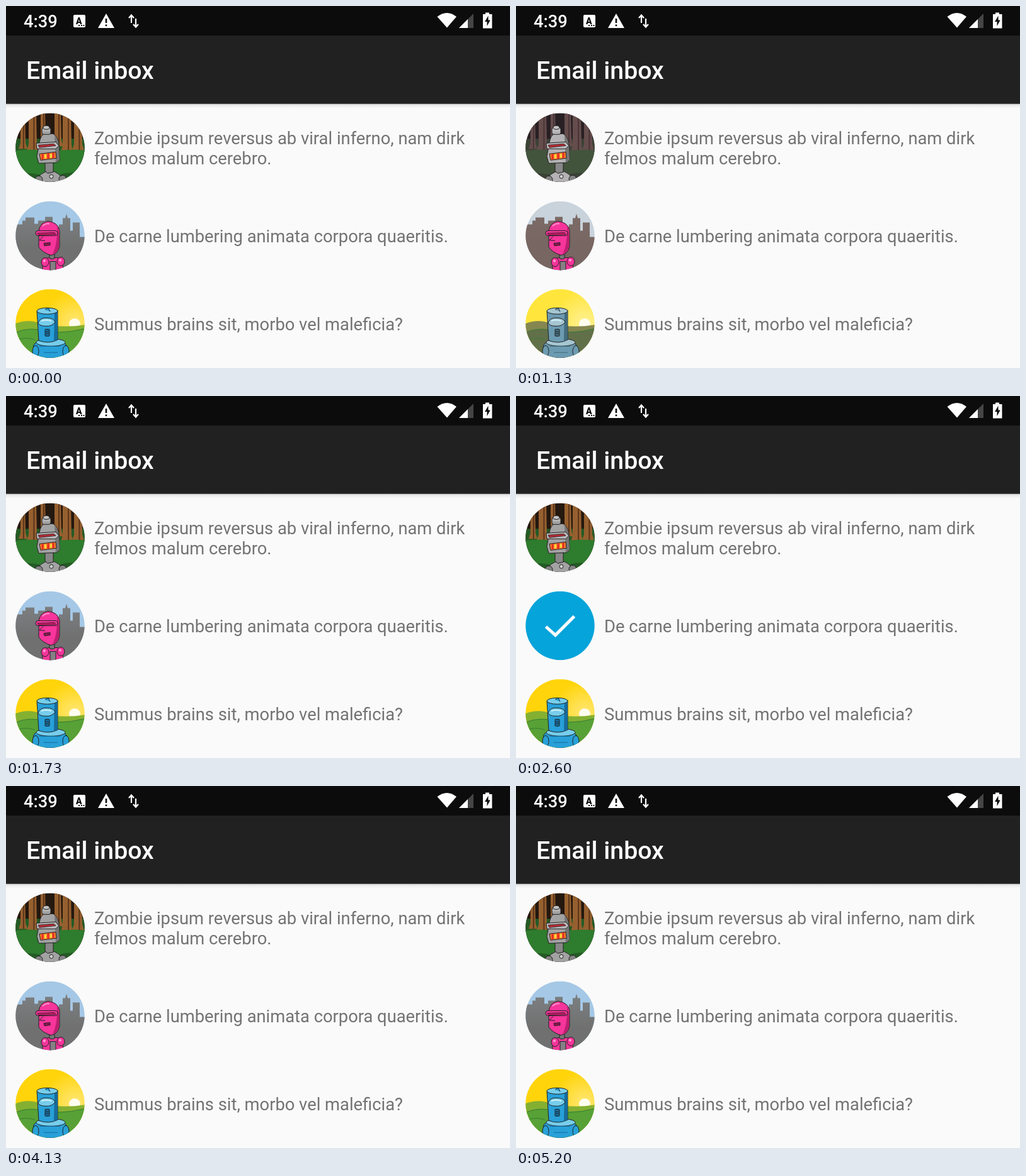
Recreate the animation shown at these times as an HTML page with a canvas. Size 800 by 576 pixels, loop 8 s.

```html
<!DOCTYPE html>
<html lang="en">
<head>
<meta charset="utf-8">
<title>Email inbox</title>
<style>
  html, body { margin: 0; width: 100%; height: 100%; overflow: hidden; background: #fafafa; }
  canvas { display: block; width: 800px; height: 576px; }
</style>
</head>
<body>
<canvas id="stage" width="800" height="576"></canvas>
<script>
const ctx = document.getElementById('stage').getContext('2d');
const LOOP = 8000, STEP = 200 / 3, FLIP_STEPS = 5;
const FLIP_ON = 2330, FLIP_OFF = 3530;
const BODY_SIZE = 27.33, BAR_END = 155.7;
const INK = '#202020';

const vivid = {
  wood: '#96602f', woodDark: '#5b351b', forest: '#24180f', leaf: '#245b25', grass: '#2e7c2e', metal: '#a3a2a3',
  sky: '#a5c8e6', city: '#707070', skyline: '#7b7e80', pink: '#f7359b', pinkDark: '#bd1f70',
  sun: '#ffd40a', glow: '#ffe56a', hillBack: '#84b032', hill: '#57a136',
  blue: '#28a0d8', blueLight: '#77cdeb', blueDark: '#176b9b'
};
const muted = {
  ...vivid, wood: '#654d4c', woodDark: '#493438', forest: '#292024', leaf: '#3b4236', grass: '#43543d', metal: '#b4b2b4',
  sky: '#c8d3dc', city: '#776661', skyline: '#7b6a66', sun: '#ffe53c', glow: '#fff08a',
  hillBack: '#858650', hill: '#62704a', blue: '#6c9bb1', blueLight: '#a5c6d2', blueDark: '#426b7d'
};

function rect(x, y, w, h, fill) {
  ctx.fillStyle = fill;
  ctx.fillRect(x, y, w, h);
}

function shape(path, fill, stroke, width = 1) {
  const p = path instanceof Path2D ? path : new Path2D(path);
  if (fill) { ctx.fillStyle = fill; ctx.fill(p); }
  if (stroke) { ctx.strokeStyle = stroke; ctx.lineWidth = width; ctx.stroke(p); }
}

function oval(x, y, rx, ry, fill, stroke) {
  const p = new Path2D();
  p.ellipse(x, y, rx, ry, 0, 0, Math.PI * 2);
  shape(p, fill, stroke);
}

function box(x, y, w, h, r, fill, stroke) {
  const p = new Path2D();
  p.roundRect(x, y, w, h, r);
  shape(p, fill, stroke);
}

function label(text, x, y, size, color, weight = 400) {
  ctx.font = `${weight} ${size}px Roboto, sans-serif`;
  ctx.fillStyle = color;
  ctx.fillText(text, x, y);
}

// Avatars are drawn around their own centre, radius 55.
function forestRobot(c) {
  rect(-55, -55, 110, 110, c.forest);
  rect(-55, -14, 110, 25, c.leaf);
  for (const [x, w, foot] of [[-47, 7, 2], [-34, 12, 4], [-15, 7, -2], [7, 10, -2], [20, 13, 6], [38, 12, 4]]) {
    shape(`M${x} -55h${w}l1 ${foot + 46} 3 9h${-w - 7}l3 -9Z`, c.wood);
    shape(`M${x + w * .7} -55V${foot}`, null, c.woodDark, 2);
  }
  shape('M-55 5Q-35 2 -18 4T22 4T55 5V55H-55Z', c.grass);
  oval(-34, 48, 24, 7, c.leaf);
  oval(34, 47, 22, 7, c.leaf);
  shape('M-22 55Q-18 39 0 37Q16 38 22 55Z', c.metal, INK);
  oval(-18, 51, 6, 6, '#858485', INK);
  oval(20, 50, 6, 6, '#858485', INK);
  shape('M-8 22L5 21V39L-4 41L-8 37Z', '#898889', INK);
  shape('M-17 -8Q-15 -20 -9 -22H5Q13 -17 14 -3L15 20L10 24L-18 25L-21 14Z', c.metal, INK);
  shape('M7 -19Q13 -14 14 -2L15 20L9 24Z', '#777677');
  box(-13, -32, 14, 11, 3, c.metal, INK);
  shape('M-12 -27H0', null, '#d3d2d3');
  oval(-6, -32, 5, 3, '#c4c3c4', INK);
  shape('M-22 -7L9 -9L14 -3L9 2L-21 2Z', '#bbbabc', INK);
  shape('M-19 -4L6 -6L9 -3L-17 0Z', '#b52c36', INK, .8);
  shape('M-17 10L9 7L10 17L-15 20Z', '#fc832a', INK);
  shape('M-12 10V19M-3 9V18M5 8V17', null, '#e42b25', 3);
  rect(-9, 11, 3, 6, '#ffd83d');
  rect(0, 10, 3, 6, '#ffd83d');
  oval(2, 46, 3, 3, '#d3d2d3', INK);
}

function cityRobot(c) {
  rect(-55, -55, 110, 110, c.sky);
  const haze = ctx.createLinearGradient(0, -30, 0, 20);
  haze.addColorStop(0, c.skyline);
  haze.addColorStop(1, c.city);
  shape('M-55 -18H-44V-24H-39V-29H-25V-19H-19V-24H-8V-30H4V-20H8V-8H14V-18H20V-28H24L26 -35L28 -28H32V-8H36V-21H47V2H55V55H-55Z', haze);
  shape('M-12 55V42Q-10 35 0 35H12Q20 36 21 55Z', c.pink, INK);
  oval(-8, 42, 6, 7, c.pink, INK);
  oval(17, 41, 6, 7, c.pink, INK);
  shape('M0 41H9V55H0Z', '#858085', INK);
  box(-1, 25, 8, 12, 2, '#777', INK);
  shape('M-18 -8Q-16 -21 -3 -23Q13 -21 15 -8L15 17Q12 30 1 31Q-12 27 -18 18Z', c.pink, INK);
  shape('M11 -16Q14 -10 14 3V17Q11 28 4 29Q12 14 11 -16Z', c.pinkDark);
  shape('M-12 -15Q-8 -20 -1 -19', null, '#ff91c9', 2);
  box(-23, -8, 35, 8, 4, c.pink, INK);
  shape('M-20 -4L7 -5L9 -2L-18 -1Z', '#cf1768', INK, .8);
  shape('M-11 1L-17 7L-8 8', null, INK);
  shape('M-10 12L0 11V15L-9 16Z', '#8b174f', INK);
  oval(-9, 40, 2, 2, '#ff9bd0');
  oval(16, 39, 2, 2, '#ff9bd0');
}

function meadowRobot(c) {
  const sky = ctx.createRadialGradient(39, 0, 6, 39, 0, 52);
  sky.addColorStop(0, c.glow);
  sky.addColorStop(1, c.sun);
  rect(-55, -55, 110, 110, sky);
  oval(39, 0, 9, 8, '#fffdf0');
  shape('M-55 0Q-34 -8 -15 0Q20 8 55 2V55H-55Z', c.hillBack);
  shape('M-55 14Q-30 4 -3 13Q26 15 55 8V55H-55Z', c.hill);
  shape('M-55 14Q-31 4 -4 13M12 14Q33 14 55 8M-55 27Q-39 20 -24 26', null, '#397c31');
  shape('M-26 34Q-20 25 -3 25Q21 25 27 36L31 55H-29Z', c.blue, INK);
  oval(1, 30, 23, 6, c.blueLight, INK);
  oval(-23, 44, 5, 9, c.blue, INK);
  oval(25, 44, 5, 9, c.blue, INK);
  shape('M-21 -20L12 -21L12 26Q-3 33 -18 27Z', c.blue, INK);
  shape('M7 -19L12 -20V26L6 28Z', c.blueDark);
  oval(-4.5, -20, 16.5, 5, c.blueLight, INK);
  shape('M-8 -22L-3 -25L0 -19', c.blue, INK);
  shape('M-19 -1Q-16 -10 -5 -9Q6 -9 8 -2Q2 5 -7 4Q-17 4 -19 -1Z', c.blueLight, INK);
  shape('M-14 -4Q-7 -7 2 -4', null, '#d0f1fb', 2);
  box(-8, 9, 7, 11, 1, c.blueDark, INK);
  shape('M-7 13H-2M-7 16H-2', null, INK, .8);
  shape('M-17 36H16M-10 46H12', null, c.blueDark);
}

function checkMark() {
  rect(-55, -55, 110, 110, '#05a4da');
  shape('M-22.5 1.5L-7.5 15L22.5 -15', null, '#fff', 5);
}

function avatar(draw, y, colors, scaleX = 1) {
  if (scaleX < .01) return;
  ctx.save();
  ctx.translate(70, y);
  ctx.scale(scaleX, 1);
  ctx.beginPath();
  ctx.arc(0, 0, 54.7, 0, Math.PI * 2);
  ctx.clip();
  draw(colors);
  ctx.restore();
}

function statusBar() {
  rect(0, 0, 800, 47, '#0c0c0c');
  label('4:39', 28, 34, BODY_SIZE, '#fff', 500);
  box(107, 14, 19, 20, 2, '#fff');
  label('A', 111, 28.5, 14, '#0c0c0c', 900);
  for (const x of [115, 119, 122.5]) rect(x, 30, 2, 2, '#0c0c0c');
  shape('M159 12L172 35H146Z', '#fff');
  rect(157.7, 20, 2.6, 7, '#0c0c0c');
  rect(157.7, 29.5, 2.6, 2.6, '#0c0c0c');
  shape('M199 27V16M195 19L199 14.5L203 19M206 20V32M202 29L206 33.5L210 29', null, '#fff', 2.2);
  shape('M684.5 17Q700 5 715 17L700 34.5Z', '#fff');
  shape('M742 12V35H719Z', '#454545');
  shape('M733 21V35H719Z', '#fff');
  shape('M761 10.5h6v2.5h4.5v22.5h-14.5V13h4Z', '#fff');
  shape('M765.5 15.5L760 25H763.5V32L768.7 22.5H765.5Z', '#0c0c0c');
}

function header() {
  const shadow = ctx.createLinearGradient(0, BAR_END, 0, BAR_END + 7);
  shadow.addColorStop(0, '#cfcfcf');
  shadow.addColorStop(.35, '#ebebeb');
  shadow.addColorStop(1, '#fafafa');
  rect(0, 155, 800, 8, shadow);
  rect(0, 47, 800, BAR_END - 47, '#212121');
  label('Email inbox', 32, 116, 39.2, '#fff', 500);
  statusBar();
}

function flipStage(t, start) {
  const step = Math.floor((t - start + .5) / STEP) + 1;
  const p = Math.min(1, Math.max(0, step / FLIP_STEPS));
  return (1 - Math.cos(p * Math.PI)) / 2;
}

function render(t) {
  const colors = t >= 1130 && t < 1200 ? muted : vivid;
  const turn = flipStage(t, FLIP_ON) - flipStage(t, FLIP_OFF);
  rect(0, 0, 800, 576, '#fafafa');
  header();
  avatar(forestRobot, 225.3, colors);
  avatar(turn > .5 ? checkMark : cityRobot, 365.5, colors, Math.abs(Math.cos(turn * Math.PI)));
  avatar(meadowRobot, 505.3, colors);
  const lines = [
    ['Zombie ipsum reversus ab viral inferno, nam dirk', 220],
    ['felmos malum cerebro.', 252],
    ['De carne lumbering animata corpora quaeritis.', 376],
    ['Summus brains sit, morbo vel maleficia?', 516]
  ];
  for (const [text, y] of lines) label(text, 140, y, BODY_SIZE, '#737373');
}

function tick() {
  render(performance.now() % LOOP);
  requestAnimationFrame(tick);
}
tick();
</script>
</body>
</html>
```
